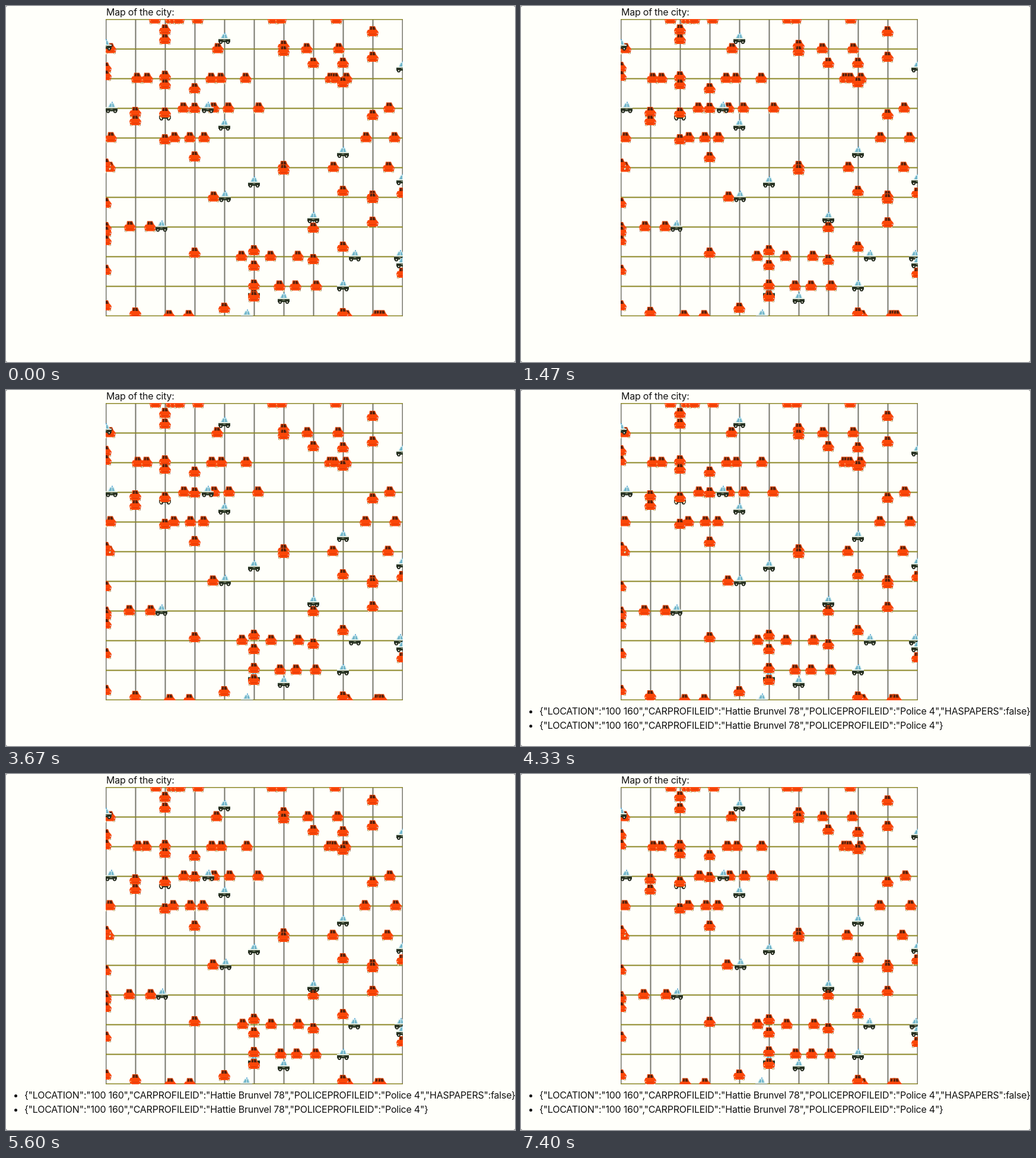
Recreate the animation shown at these times as an HTML page with a canvas. Size 858 by 600 pixels, loop 7470 ms.

```html
<!DOCTYPE html>
<html lang="en">
<head>
<meta charset="utf-8">
<title>City map</title>
<style>
  html, body { margin: 0; width: 100%; height: 100%; overflow: hidden; background: #777; }
  main { position: relative; width: 858px; height: 600px; background: #fffffa; border-radius: 3px;
         font: 16px/24px Inter, sans-serif; letter-spacing: -.24px; color: #111; }
  p, ul, canvas { position: absolute; margin: 0; white-space: nowrap; }
  p { left: 169px; top: -2px; }
  canvas { left: 168px; top: 22px; }
  ul { left: 0; top: 529px; padding-left: 31px; }
</style>
</head>
<body>
<main>
  <p>Map of the city:</p>
  <canvas id="map" width="501" height="501"></canvas>
  <ul id="log">
    <li>{"LOCATION":"100 160","CARPROFILEID":"Hattie Brunvel 78","POLICEPROFILEID":"Police 4","HASPAPERS":false}</li>
    <li>{"LOCATION":"100 160","CARPROFILEID":"Hattie Brunvel 78","POLICEPROFILEID":"Police 4"}</li>
  </ul>
</main>
<script>
const LOOP = 7470, LEFT = 168, TOP = 22, GAP = 50;
const ctx = document.getElementById('map').getContext('2d');
const log = document.getElementById('log');

// Position along each street; a minus sign means driving left or up.
const carRows = [
  [251, 278, 284, 291, 323, -451, 463, -557],
  [-176, -357, 507, -561],
  [221, -238, 346, 362, 404, -547, -555, -574],
  [299, 350, 375, -426, 646],
  [-177, -284, 310, -334, -607, 655],
  [-175, -552, -645],
  [-350],
  [-209, 243],
  [397, 446, 492],
  [461, 488, -523],
  [275, 308, 574, 625, -634]
];
const carCols = [
  [-104, 117, -266, -332, 373, -380, -395, -445, 505],
  [-179, 193, -517],
  [-40, 56, 118, 132, 180, 225],
  [-139, 172, 254, 416],
  [-509],
  [412, -438, -470, 487, -490],
  [-67, -76, -270, -276],
  [-96, -374, 427],
  [96, -129, -312, -406, -518],
  [43, 86, -184, 320, 324, 364],
  [-315, 450]
];
const policeRows = [[], [], [], [-178, 340], [], [], [369], [262], [-588, 664], [], [-406]];
const policeCols = [[66], [], [], [], [-55, -201], [-297], [-493], [357], [247, 472], [], [-103, 293, 433]];
const hiddenPolice = [[], [], [184], [], [], [-483]];

function shape(color, ...points) {
  ctx.fillStyle = color;
  ctx.beginPath();
  for (let i = 0; i < points.length; i += 2) ctx.lineTo(points[i], points[i + 1]);
  ctx.fill();
}

function box(color, x, y, w, h) {
  ctx.fillStyle = color;
  ctx.fillRect(x, y, w, h);
}

function disc(color, x, y, r) {
  ctx.fillStyle = color;
  ctx.beginPath();
  ctx.arc(x, y, r, 0, 7);
  ctx.fill();
}

function car() {
  for (const x of [-7, 7]) {
    box('#a98f7c', x - 2, 4, 4, 5);
    box('#f0e3b0', x - 1, 7, 2, 3);
  }
  shape('#e34a10', -6, -2, -5, -9, 4, -9, 7, -2);
  shape('#55200c', -4.5, -2, -3.5, -8, -1, -8, -1, -2);
  shape('#55200c', 0, -2, 0, -8, 3, -8, 5, -2);
  shape('#fb4708', -8, -3, 7, -3, 10, 1, 9, 6, 5, 8, -5, 8, -9, 6, -10, 1);
  box('#d93405', -5, 4, 10, 1);
  box('#ff9a60', -9, 2, 2, 2);
  box('#d9a0a0', 7, 2, 2, 2);
}

function police() {
  shape('#d8eef0', -7, 0, -3, -8, 4, -8, 7, 0);
  shape('#72b6cb', -5, -1, -2, -7, 0, -7, 0, -1);
  shape('#72b6cb', 1, -1, 1, -7, 3, -7, 5, -1);
  box('#5aa9d6', 0, -10, 2, 2);
  box('#e4eee4', -10, -1, 20, 2);
  box('#2c3826', -10, 1, 20, 5);
  box('#9aa58c', -2, 2, 4, 1);
  for (const x of [-6, 6]) {
    disc('#20261c', x, 6, 3);
    disc('#d5dac8', x, 6, 1.2);
  }
}

function drive(streets, vertical, sprite, shift) {
  streets.forEach((street, i) => street.forEach(v => {
    const along = Math.abs(v) + Math.sign(v) * shift(Math.abs(v));
    ctx.save();
    if (vertical) ctx.translate(GAP * i, along - TOP);
    else ctx.translate(along - LEFT, GAP * i - .5);
    sprite();
    ctx.restore();
  }));
}

function draw() {
  const t = performance.now() % LOOP;
  const carShift = v => Math.floor(v * 7 % 10 / 10 + 2.1 * t / LOOP);
  const policeShift = v => t > 4700 + v * 37 % 700 ? 1 : 0;

  ctx.clearRect(0, 0, 501, 501);
  for (let i = 0; i <= 10; i++) box('#77766c', GAP * i - .5, 0, 2, 501);
  for (let i = 0; i <= 10; i++) box('#8c8727', 0, GAP * i - .5, 501, 2);

  drive(hiddenPolice, true, police, policeShift);
  drive(carRows, false, car, carShift);
  drive(carCols, true, car, carShift);
  drive(policeRows, false, police, policeShift);
  drive(policeCols, true, police, policeShift);

  log.style.visibility = t >= 4330 ? 'visible' : 'hidden';
  requestAnimationFrame(draw);
}
draw();
</script>
</body>
</html>
```
